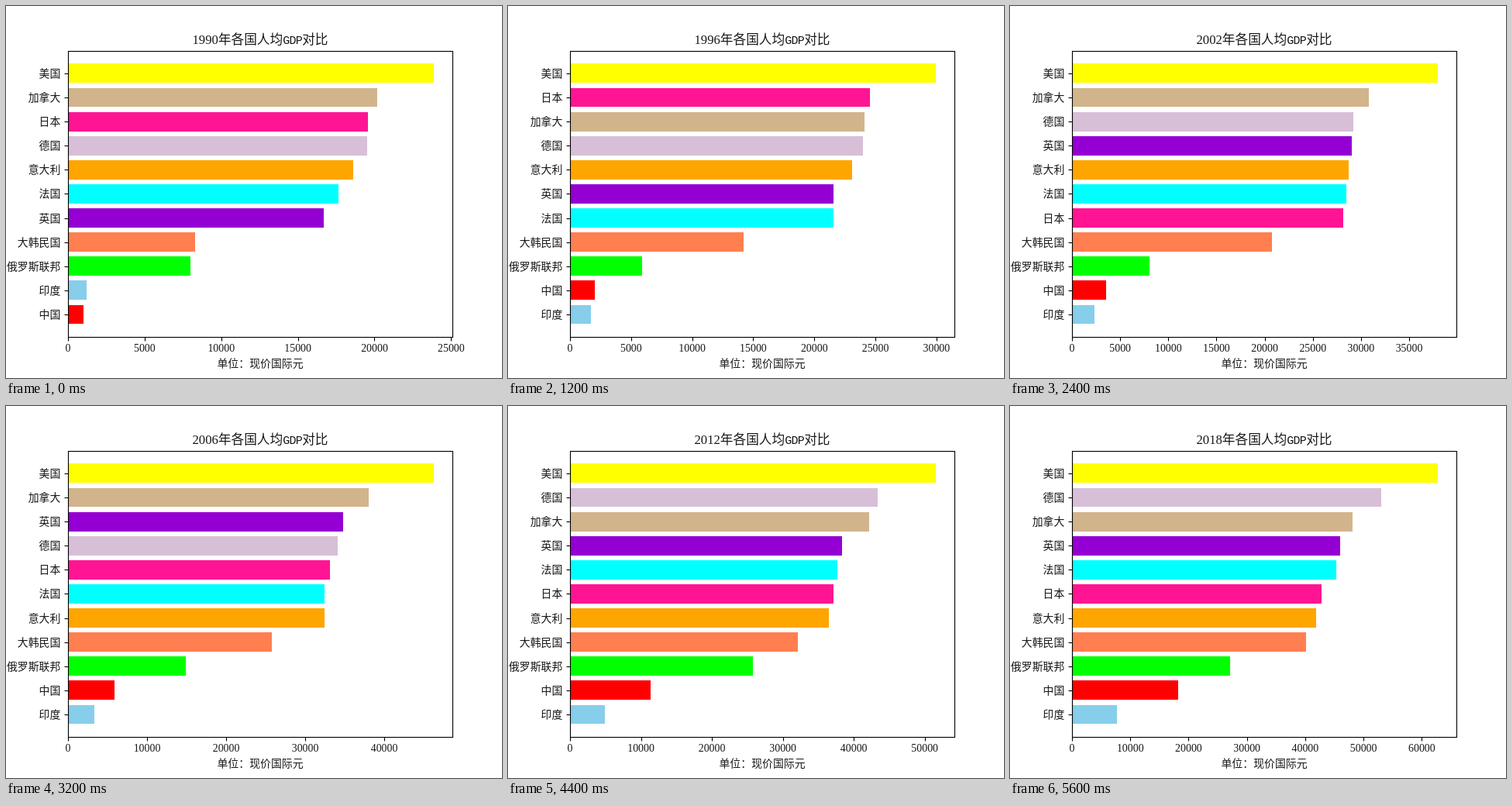
These frames come from a looping animation (640x480 px, 5.8 s). An HTML page with a canvas:

```html
<!DOCTYPE html>
<html lang="zh-CN">
<head>
<meta charset="utf-8">
<title>人均GDP</title>
<style>
  html, body { margin: 0; width: 100%; height: 100%; overflow: hidden; background: #fff; }
  canvas { display: block; }
</style>
</head>
<body>
<canvas id="stage" width="640" height="480"></canvas>
<script>
const ctx = document.getElementById('stage').getContext('2d');

const START = 1990, YEARS = 29, STEP_MS = 200;
const LEFT = 80, RIGHT = 576, TOP = 58, BOTTOM = 427;
const PITCH = 369.6 / 11.88, FIRST = 57.6 + PITCH * 0.94;
const TITLE = 12 * 100 / 72, SMALL = 10 * 100 / 72;
const INK = '#181818';
const CJK = '"Noto Sans CJK SC", "Noto Sans CJK", sans-serif';
const SERIF = '"Liberation Serif", serif';
const MONO = '"Liberation Mono", monospace';

// The leader sets the axis, so it has a value for every year.
const leader = [
  23889, 24342, 25419, 26387, 27695, 28691, 29968, 31459, 32854, 34515,
  36335, 37133, 38005, 39490, 41725, 44123, 46302, 48050, 48570, 47195,
  48651, 50066, 51603, 53107, 55050, 56863, 58021, 60000, 62795
];

// The others are interpolated between these years.
const knots = [1990, 1993, 1997, 1998, 2000, 2002, 2006, 2008, 2009, 2012, 2015, 2018];
const others = [
  ['加拿大', 'tan', [20178, 21394, 25050, 26220, 29265, 30809, 38024, 40280, 38800, 42167, 44670, 48120]],
  ['日本', 'deeppink', [19571, 21785, 25480, 25108, 26840, 28154, 33124, 35200, 33300, 37142, 40400, 42803]],
  ['德国', 'thistle', [19520, 21841, 24680, 25316, 27300, 29200, 34104, 38400, 37100, 43368, 47800, 53040]],
  ['意大利', 'orange', [18610, 20389, 24010, 25038, 27080, 28717, 32438, 34900, 34200, 36486, 37000, 41873]],
  ['法国', 'cyan', [17650, 19187, 22350, 23369, 26100, 28476, 32480, 35100, 34800, 37688, 40800, 45329]],
  ['英国', 'darkviolet', [16688, 18266, 22700, 23647, 26410, 29039, 34790, 37400, 35500, 38343, 42300, 45994]],
  ['大韩民国', 'coral', [8294, 10893, 15330, 14606, 18080, 20753, 25774, 28700, 28400, 32117, 35700, 40145]],
  ['俄罗斯联邦', 'lime', [7990, 6424, 5700, 5494, 6825, 8044, 14896, 20164, 19387, 25780, 24100, 27118]],
  ['印度', 'skyblue', [1214, 1390, 1780, 1866, 2090, 2333, 3332, 3900, 4200, 4916, 6150, 7710]],
  ['中国', 'red', [987, 1430, 2260, 2434, 2921, 3540, 5880, 7610, 8374, 11361, 14400, 18210]]
];

function valueAt(values, year) {
  let i = 0;
  while (i < knots.length - 2 && year >= knots[i + 1]) i++;
  const k = (year - knots[i]) / (knots[i + 1] - knots[i]);
  return values[i] + (values[i + 1] - values[i]) * k;
}

function ranking(year) {
  const rows = others.map(([name, color, values]) => ({ name, color, value: valueAt(values, year) }));
  rows.push({ name: '美国', color: 'yellow', value: leader[year - START] });
  return rows.sort((a, b) => b.value - a.value);
}

function text(str, x, y, size, family, align = 'left', weight = 400, spacing = 0) {
  ctx.font = `${weight} ${size}px ${family}`;
  ctx.letterSpacing = spacing + 'px';
  ctx.textAlign = align;
  ctx.fillStyle = INK;
  ctx.fillText(str, x, y);
}

function line(x1, y1, x2, y2) {
  ctx.beginPath();
  ctx.moveTo(x1, y1);
  ctx.lineTo(x2, y2);
  ctx.stroke();
}

function drawTitle(year) {
  let x = (LEFT + RIGHT) / 2 - TITLE * 5.25;
  const y = 49;
  text(String(year), x, y, TITLE, SERIF);
  x += TITLE * 2;
  text('年各国人均', x, y, TITLE, CJK, 'left', 300);
  x += TITLE * 5;
  text('GDP', x, y, 15, MONO, 'left', 400, -0.67);
  x += TITLE * 1.5;
  text('对比', x, y, TITLE, CJK, 'left', 300);
}

function draw(year) {
  const rows = ranking(year);
  const max = rows[0].value * 1.05;
  const scale = (RIGHT - LEFT) / max;

  ctx.fillStyle = '#fff';
  ctx.fillRect(0, 0, 640, 480);
  ctx.strokeStyle = '#000';
  ctx.lineWidth = 0.8 * 100 / 72;

  rows.forEach((row, i) => {
    const mid = FIRST + i * PITCH;
    const top = Math.round(mid - PITCH * 0.4);
    const end = Math.round(mid + PITCH * 0.4);
    ctx.fillStyle = row.color;
    ctx.fillRect(LEFT, top, Math.round(row.value * scale), end - top);
    const tick = Math.round(mid) + 0.5;
    line(LEFT - 4.5, tick, LEFT + 0.5, tick);
    text(row.name, 70.3, Math.round(mid) + 5, SMALL, CJK, 'right', 300);
  });

  const step = max / 9 > 5000 ? 10000 : 5000;
  for (let v = 0; v <= max; v += step) {
    const x = LEFT + v * scale;
    const tick = Math.round(x) + 0.5;
    line(tick, BOTTOM + 0.5, tick, BOTTOM + 5.5);
    text(String(v), x, 446, SMALL, SERIF, 'center');
  }

  ctx.strokeRect(LEFT + 0.5, TOP + 0.5, RIGHT - LEFT, BOTTOM - TOP);
  drawTitle(year);
  text('单位：现价国际元', (LEFT + RIGHT) / 2, 466, SMALL, CJK, 'center', 300);
}

const begin = performance.now();
function frame() {
  const t = Math.max(0, performance.now() - begin);
  draw(START + Math.floor(t / STEP_MS) % YEARS);
  requestAnimationFrame(frame);
}
frame();
</script>
</body>
</html>
```
